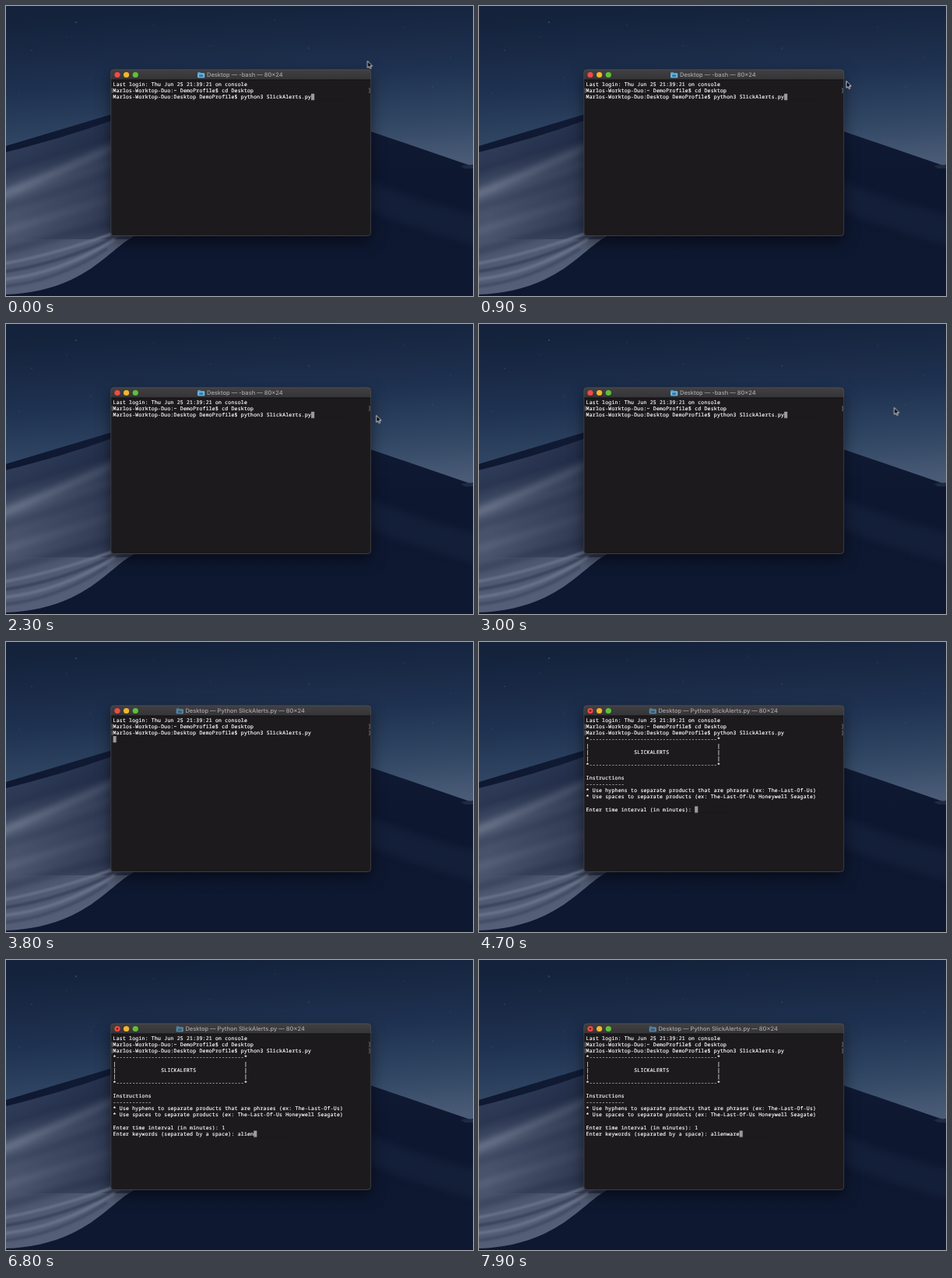
Recreate the animation shown at these times as an HTML page. Size 600x373 px, loop 8 s.

```html
<!DOCTYPE html>
<html lang="en">
<head>
<meta charset="utf-8">
<title>Terminal session</title>
<style>
  html, body { margin: 0; width: 100%; height: 100%; overflow: hidden; background: #14213a; }
  svg { display: block; width: 100vw; height: 100vh; }
  filter { color-interpolation-filters: sRGB; }

  /* One terminal cell is 7 by 14 units. */
  .term { --c: 7px; --r: 14px; }
  .term text {
    font: 500 11px "Noto Sans Mono", "DejaVu Sans Mono", monospace;
    letter-spacing: .4px;
    fill: #fff; stroke: #fff; stroke-width: .3px;
    white-space: pre; text-rendering: geometricPrecision;
  }
  .title {
    font: 500 7.5px Inter, sans-serif;
    fill: #a8a7a9; text-rendering: geometricPrecision;
  }

  /* The small lead keeps every change on its own side of a 100 ms tick. */
  .anim { animation: 8s step-end -40ms infinite; }
  .idle { animation-name: idle; }
  .busy { animation-name: busy; }
  .ran { animation-name: ran; }
  .output { animation-name: output; }
  .keywords { animation-name: keywords; }
  .caret { animation-name: caret; }
  .arrow { animation-name: arrow; }
  .resize { animation-name: resize; }

  @keyframes idle { 0% { visibility: visible } 47.5%, 100% { visibility: hidden } }
  @keyframes busy { 0% { visibility: hidden } 47.5%, 100% { visibility: visible } }
  @keyframes ran { 0% { visibility: hidden } 46.25%, 100% { visibility: visible } }
  @keyframes output { 0% { visibility: hidden } 50%, 100% { visibility: visible } }
  @keyframes keywords { 0% { visibility: hidden } 75%, 100% { visibility: visible } }
  @keyframes resize {
    0% { visibility: hidden } 18.75% { visibility: visible } 20%, 100% { visibility: hidden }
  }

  @keyframes caret {
    0% { transform: translate(calc(62 * var(--c)), calc(2 * var(--r))) }
    46.25% { transform: translate(0, calc(3 * var(--r))) }
    50% { transform: translate(calc(34 * var(--c)), calc(14 * var(--r))) }
    66.25% { transform: translate(calc(35 * var(--c)), calc(14 * var(--r))) }
    75% { transform: translate(calc(39 * var(--c)), calc(15 * var(--r))) }
    80% { transform: translate(calc(40 * var(--c)), calc(15 * var(--r))) }
    81.25% { transform: translate(calc(41 * var(--c)), calc(15 * var(--r))) }
    82.5% { transform: translate(calc(42 * var(--c)), calc(15 * var(--r))) }
    83.75% { transform: translate(calc(43 * var(--c)), calc(15 * var(--r))) }
    85% { transform: translate(calc(44 * var(--c)), calc(15 * var(--r))) }
    95% { transform: translate(calc(45 * var(--c)), calc(15 * var(--r))) }
    96.25% { transform: translate(calc(46 * var(--c)), calc(15 * var(--r))) }
    97.5% { transform: translate(calc(47 * var(--c)), calc(15 * var(--r))) }
    98.75%, 100% { transform: translate(calc(48 * var(--c)), calc(15 * var(--r))) }
  }

  @keyframes arrow {
    0% { transform: translate(464.4px, 70.6px); opacity: 1; animation-timing-function: steps(5) }
    6.25% { transform: translate(469px, 92px) }
    8.75% { transform: translate(469px, 92px); animation-timing-function: steps(4) }
    13.75% { transform: translate(475px, 101px); animation-timing-function: steps(4) }
    18.74% { transform: translate(469px, 108px); opacity: 1 }
    18.75% { transform: translate(469px, 108px); opacity: 0 }
    20% { transform: translate(464.4px, 118px); opacity: 1 }
    21.25% { transform: translate(464.4px, 119.5px) }
    27.5% { transform: translate(464.4px, 119.5px); animation-timing-function: steps(6) }
    35% { transform: translate(533.1px, 107.7px) }
    37.5% { transform: translate(533.5px, 107.5px); opacity: 1 }
    46.25%, 100% { transform: translate(533.5px, 107.5px); opacity: 0 }
  }
</style>
</head>
<body>
<svg viewBox="0 0 600 373" preserveAspectRatio="none">
  <defs>
    <linearGradient id="sky" x1=".45" y1="0" x2=".55" y2="1">
      <stop offset="0" stop-color="#14223b"/>
      <stop offset=".25" stop-color="#1e3150"/>
      <stop offset=".43" stop-color="#304663"/>
      <stop offset=".58" stop-color="#4a5b77"/>
    </linearGradient>
    <linearGradient id="lit" gradientUnits="userSpaceOnUse" x1="45" y1="172" x2="100" y2="350">
      <stop offset="0" stop-color="#2f3c59"/>
      <stop offset=".13" stop-color="#2a3651"/>
      <stop offset=".3" stop-color="#4d5870"/>
      <stop offset=".5" stop-color="#47516a"/>
      <stop offset=".72" stop-color="#4f5971"/>
      <stop offset="1" stop-color="#565f77"/>
    </linearGradient>
    <linearGradient id="dusk" gradientUnits="userSpaceOnUse" x1="20" y1="230" x2="150" y2="250">
      <stop offset="0" stop-color="#18233d" stop-opacity="0"/>
      <stop offset="1" stop-color="#18233d" stop-opacity=".6"/>
    </linearGradient>
    <linearGradient id="shade" x1="0" y1="0" x2="0" y2="1">
      <stop offset="0" stop-color="#121c35"/>
      <stop offset=".4" stop-color="#0d1730"/>
      <stop offset="1" stop-color="#0e1830"/>
    </linearGradient>
    <linearGradient id="bar" x1="0" y1="0" x2="0" y2="1">
      <stop offset="0" stop-color="#403f42"/>
      <stop offset="1" stop-color="#353437"/>
    </linearGradient>
    <filter id="soft" x="-20%" y="-20%" width="140%" height="140%"><feGaussianBlur stdDeviation="4"/></filter>
    <filter id="fine" x="-20%" y="-20%" width="140%" height="140%"><feGaussianBlur stdDeviation="1.3"/></filter>
    <filter id="shadow" x="-20%" y="-20%" width="140%" height="150%">
      <feDropShadow dx="0" dy="7" stdDeviation="9" flood-color="#000" flood-opacity=".5"/>
    </filter>
    <path id="slope" d="M0 188C48 176 92 163 134 148L200 126V290L164 296C140 310 122 334 84 352C58 364 30 370 0 371Z"/>
    <clipPath id="dune"><use href="#slope"/></clipPath>
    <g id="folder">
      <path d="M0 .8Q0 0 .8 0H3.2L4.1 1H8.2Q9 1 9 1.8V6.6Q9 7.4 8.2 7.4H.8Q0 7.4 0 6.6Z" fill="#4c9fce"/>
      <path d="M0 2.2H9V6.6Q9 7.4 8.2 7.4H.8Q0 7.4 0 6.6Z" fill="#6db9e2"/>
      <path d="M2 3.4H7V6.2H2Z" fill="#3577a3"/>
    </g>
    <path id="mark" d="M137.2 1.3H136.2V6.9H137.2M466.2 1.3H467.2V6.9H466.2" fill="none" stroke="#8d8c8e" stroke-width=".7"/>
  </defs>

  <rect width="600" height="373" fill="url(#sky)"/>
  <g fill="#a9b9d4" opacity=".55">
    <circle cx="90" cy="21" r=".7"/><circle cx="33" cy="57" r=".5"/><circle cx="78" cy="40" r=".4"/>
    <circle cx="190" cy="24" r=".4"/><circle cx="262" cy="51" r=".4"/><circle cx="345" cy="18" r=".4"/>
    <circle cx="389" cy="54" r=".5"/><circle cx="512" cy="27" r=".4"/><circle cx="571" cy="66" r=".4"/>
    <circle cx="17" cy="112" r=".4"/><circle cx="109" cy="92" r=".4"/><circle cx="548" cy="104" r=".4"/>
  </g>

  <path d="M0 180L240 108Q360 122 469 161.5L596 205 600 204V373H0Z" fill="url(#shade)"/>
  <path d="M584 206Q591 203 600 205V209H590Z" fill="#1f2a42"/>
  <path d="M460 222Q530 252 610 270V310Q530 290 460 260Z" fill="#16213c" filter="url(#soft)" opacity=".7"/>

  <use href="#slope" fill="url(#lit)"/>
  <g clip-path="url(#dune)" fill="none">
    <g filter="url(#soft)">
      <path d="M-10 245Q60 218 150 176" stroke="#727c92" stroke-width="7"/>
      <path d="M-10 262Q80 236 160 206" stroke="#3a455f" stroke-width="8"/>
      <path d="M-10 292Q70 268 160 240" stroke="#5b647b" stroke-width="9"/>
      <path d="M-10 318Q80 292 180 268" stroke="#364059" stroke-width="8"/>
    </g>
    <path d="M0 140H200V300H0Z" fill="url(#dusk)"/>
    <g filter="url(#fine)" stroke-width="4">
      <path d="M-5 332Q70 318 150 288" stroke="#667087"/>
      <path d="M-5 342Q70 332 150 293" stroke="#3a445d"/>
      <path d="M-5 352Q70 344 140 300" stroke="#687188"/>
      <path d="M-5 361Q66 354 130 312" stroke="#434d66"/>
    </g>
  </g>

  <rect x="134.5" y="81.6" width="334.5" height="214.2" rx="4" fill="#1c1a1d" filter="url(#shadow)"/>
  <path d="M134.5 94.8V85.6Q134.5 81.6 138.5 81.6H465Q469 81.6 469 85.6V94.8Z" fill="url(#bar)"/>
  <path d="M134.5 95H469" stroke="#0b0a0c" stroke-width=".7"/>
  <rect x="134.8" y="81.9" width="333.9" height="213.6" rx="4" fill="none" stroke="#57565a" stroke-width=".6"/>
  <circle cx="143" cy="88.5" r="3.6" fill="#ee4c45"/>
  <circle cx="154.6" cy="88.5" r="3.6" fill="#f1b62f"/>
  <circle cx="166.3" cy="88.5" r="3.6" fill="#5fc038"/>

  <g class="anim idle">
    <use href="#folder" x="246.2" y="84.9"/>
    <text class="title" x="258" y="91.3">Desktop — -bash — 80×24</text>
  </g>
  <g class="anim busy">
    <use href="#folder" x="218.8" y="84.9" opacity=".6"/>
    <text class="title" x="230.4" y="91.3">Desktop — Python SlickAlerts.py — 80×24</text>
  </g>
  <circle class="anim output" cx="143" cy="88.5" r="1.2" fill="#75100f"/>

  <use href="#mark" y="104.6"/>
  <use class="anim ran" href="#mark" y="112.8"/>

  <g class="term" transform="translate(137.6 96.4) scale(.5864)">
    <text y="10.8">Last login: Thu Jun 25 21:39:21 on console</text>
    <text y="24.8">Marlos-Worktop-Duo:~ DemoProfile$ cd Desktop</text>
    <text y="38.8">Marlos-Worktop-Duo:Desktop DemoProfile$ python3 SlickAlerts.py</text>
    <g class="anim output" xml:space="preserve">
      <text y="52.8">*----------------------------------------*</text>
      <text y="66.8">|                                        |</text>
      <text y="80.8">|              SLICKALERTS               |</text>
      <text y="94.8">|                                        |</text>
      <text y="108.8">*----------------------------------------*</text>
      <text y="136.8">Instructions</text>
      <text y="150.8">------------</text>
      <text y="164.8">* Use hyphens to separate products that are phrases (ex: The-Last-Of-Us)</text>
      <text y="178.8">* Use spaces to separate products (ex: The-Last-Of-Us Honeywell Seagate)</text>
      <text y="206.8">Enter time interval (in minutes): 1</text>
    </g>
    <text class="anim keywords" y="220.8">Enter keywords (separated by a space): alienware</text>
    <!-- The dark strip hides what is not typed yet. -->
    <g class="anim caret">
      <rect y=".2" width="70" height="14" fill="#1c1a1d"/>
      <rect width="7" height="14" fill="#9b9a9c"/>
    </g>
  </g>

  <path class="anim resize" transform="translate(468.4 109.3)" d="M-5 0-2-2.9V-1H2V-2.9L5 0 2 2.9V1H-2V2.9Z" fill="#000" stroke="#fff" stroke-width=".8"/>
  <path class="anim arrow" d="M0 0V8.8L2 7 3.3 10 4.8 9.4 3.5 6.5H6.2Z" fill="#000" stroke="#fff" stroke-width=".8"/>
</svg>
</body>
</html>
```
